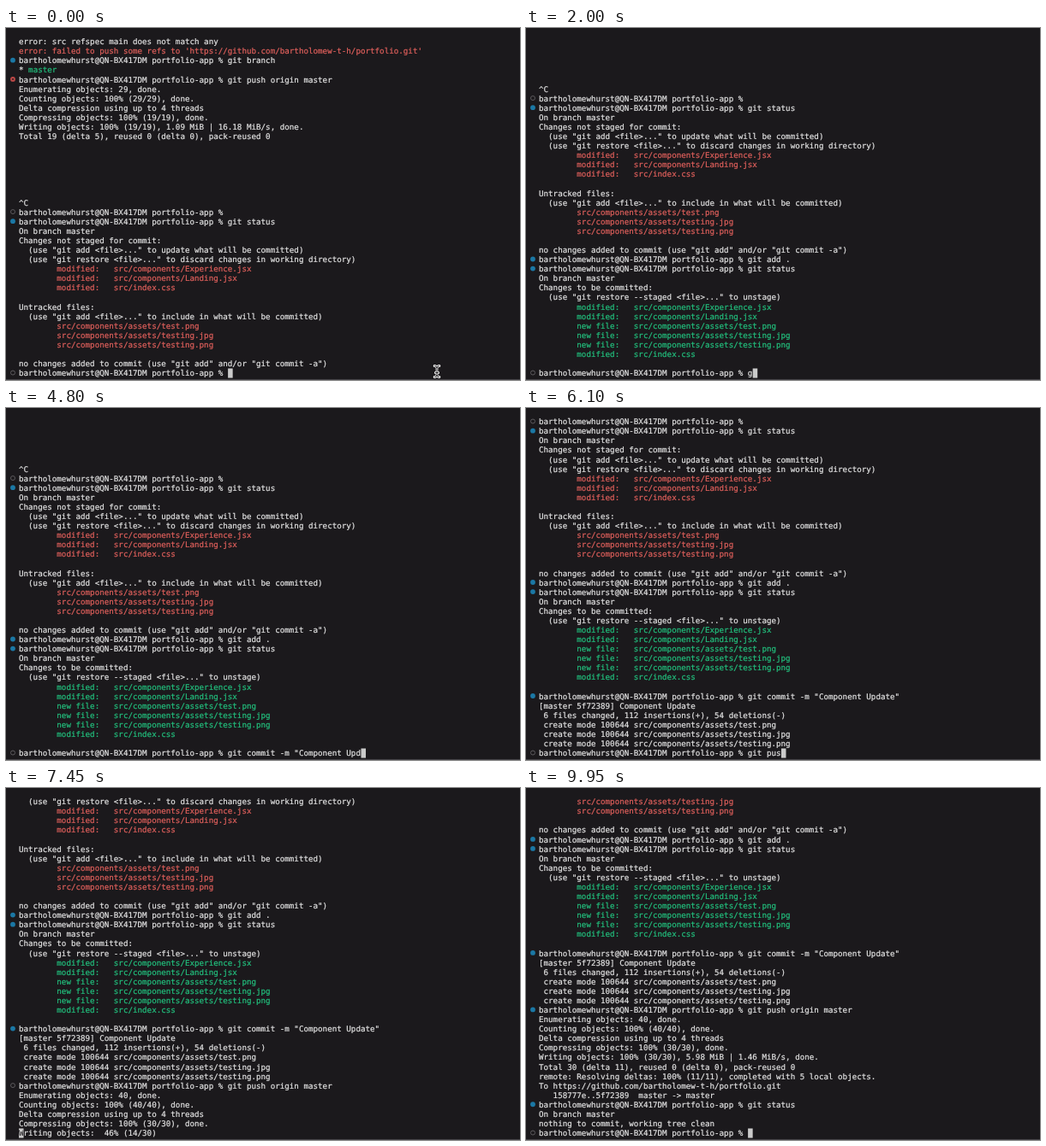
Animation of 600 by 412 pixels, one loop 10 s. Source, as an HTML page:

```html
<!DOCTYPE html>
<html lang="en">
<head>
<meta charset="utf-8">
<title>Terminal session</title>
<style>
  html, body { margin: 0; width: 100%; height: 100%; overflow: hidden; background: #1b191c; }
  svg { display: block; width: 100vw; height: 100vh; }
  text {
    font: 9.215px "DejaVu Sans Mono", monospace;
    white-space: pre;
    text-rendering: geometricPrecision;
    font-variant-ligatures: none;
    stroke-width: 0.22px;
  }
</style>
</head>
<body>
<svg id="stage" viewBox="0 0 600 412">
  <rect width="600" height="412" fill="#1b191c"/>
  <rect y="411" width="600" height="1" fill="#454347"/>
  <g id="rows"></g>
  <rect id="cursor" fill="#cbcbcb"/>
  <text id="under" fill="#1b191c"></text>
  <g id="mouse" fill="none" stroke-linecap="round">
    <path id="beam" d="M500 395.5Q503 395.5 503 398Q503 395.5 506 395.5M503 398V406M500 408.5Q503 408.5 503 406Q503 408.5 506 408.5M501.3 403.5H504.7" stroke="#f4f4f4" stroke-width="2.4"/>
    <use href="#beam"/>
    <path d="M500.5 395.5Q503 395.5 503 398Q503 395.5 505.5 395.5M503 398V406M500.5 408.5Q503 408.5 503 406Q503 408.5 505.5 408.5M501.5 403.5H504.5" stroke="#1b191c" stroke-width="0.9"/>
  </g>
</svg>
<script>
const LOOP = 10000, STEP = 50, ROWS = 36;
const LEFT = 15, TOP = 10.5, PITCH = 11.085, CHAR = 5.548, BASE = 8.7;
const WHITE = '#e2e2e2', RED = '#de5f5b', GREEN = '#22bf7d';
const PROMPT = 'bartholomewhurst@QN-BX417DM portfolio-app % ';
const REPO = 'https://github.com/bartholomew-t-h/portfolio.git';
const ASSETS = ['test.png', 'testing.jpg', 'testing.png'].map(f => 'src/components/assets/' + f);
const TAB = ' '.repeat(8);

const $ = id => document.getElementById(id);
const line = (text = '', color = WHITE, lead = 0) => ({ text, color, lead, dot: '' });
const prompt = (cmd, dot) => ({ ...line(PROMPT + cmd), dot });
const plain = (...texts) => texts.map(t => line(t));
const files = (color, ...names) => names.map(n => line(TAB + n, color));

// Screen contents before the first key press
const initial = () => [
  line('error: src refspec main does not match any'),
  line(`error: failed to push some refs to '${REPO}'`, RED),
  prompt('git branch', 'ok'),
  line('* master', GREEN, 2),
  prompt('git push origin master', 'fail'),
  ...plain(
    'Enumerating objects: 29, done.',
    'Counting objects: 100% (29/29), done.',
    'Delta compression using up to 4 threads',
    'Compressing objects: 100% (19/19), done.',
    'Writing objects: 100% (19/19), 1.09 MiB | 16.18 MiB/s, done.',
    'Total 19 (delta 5), reused 0 (delta 0), pack-reused 0',
    '', '', '', '', '', '', '^C'),
  prompt('', 'idle'),
  prompt('git status', 'ok'),
  ...plain(
    'On branch master',
    'Changes not staged for commit:',
    '  (use "git add <file>..." to update what will be committed)',
    '  (use "git restore <file>..." to discard changes in working directory)'),
  ...files(RED,
    'modified:   src/components/Experience.jsx',
    'modified:   src/components/Landing.jsx',
    'modified:   src/index.css'),
  ...plain('', 'Untracked files:',
    '  (use "git add <file>..." to include in what will be committed)'),
  ...files(RED, ...ASSETS),
  ...plain('', 'no changes added to commit (use "git add" and/or "git commit -a")'),
  prompt('', 'idle')
];

// Timeline of edits to the list of lines
const events = [];
const at = (time, run) => events.push({ time, run });
const last = lines => lines[lines.length - 1];

function type(text, from, to = from) {
  const gaps = Math.max(1, text.length - 1);
  [...text].forEach((ch, i) => {
    const time = from + Math.round((to - from) * i / gaps / STEP) * STEP;
    at(time, lines => { last(lines).text += ch; });
  });
}
const enter = time => at(time, lines => lines.push(line()));
const show = (time, text) => at(time, lines => { last(lines).text = text; });
const print = (time, rows) => at(time, lines => {
  lines.pop();
  lines.push(...rows.map(r => ({ ...r })), line());
});
const finish = time => at(time, lines => {
  lines.pop();
  lines.findLast(l => l.dot).dot = 'ok';
  lines.push(prompt('', 'idle'));
});
const progress = (label, done, total) =>
  `${label}: ${String(Math.floor(100 * done / total)).padStart(3)}% (${done}/${total})`;

type('git add', 50, 400);
type(' ', 500);
type('.', 650);
enter(700);
finish(750);

type('git', 1000, 1100);
type(' s', 1200, 1250);
type('tatu', 1350, 1550);
type('s', 1700);
enter(1700);
print(1750, [
  ...plain('On branch master', 'Changes to be committed:',
    '  (use "git restore --staged <file>..." to unstage)'),
  ...files(GREEN,
    'modified:   src/components/Experience.jsx',
    'modified:   src/components/Landing.jsx',
    ...ASSETS.map(a => 'new file:   ' + a),
    'modified:   src/index.css'),
  line()
]);
finish(1750);

type('git commit', 2000, 2600);
type(' ', 2750);
type('-m', 2950, 3050);
type(' "C', 3200, 3500);
type('omponent Up', 3750, 4750);
type('date', 4800, 5000);
type('"', 5450);
enter(5450);
print(5500, plain('[master 5f72389] Component Update',
  ' 6 files changed, 112 insertions(+), 54 deletions(-)',
  ...ASSETS.map(a => ' create mode 100644 ' + a)));
finish(5500);

type('git pus', 5750, 6100);
type('h ', 6250, 6300);
type('or', 6500);
type('igin master', 6550, 7050);
enter(7250);
print(7300, plain('Enumerating objects: 40, done.',
  'Counting objects: 100% (40/40), done.',
  'Delta compression using up to 4 threads'));
show(7300, progress('Compressing objects', 12, 30));
print(7350, plain('Compressing objects: 100% (30/30), done.'));
[3, 9, 14].forEach((n, i) => show(7350 + i * STEP, progress('Writing objects', n, 30)));
for (let i = 1; i <= 15; i++) {
  const size = (5.98 * i / 15).toFixed(2);
  show(7450 + i * STEP, `${progress('Writing objects', 14 + i, 30)}, ${size} MiB | 1.46 MiB/s`);
}
print(8250, plain('Writing objects: 100% (30/30), 5.98 MiB | 1.46 MiB/s, done.',
  'Total 30 (delta 11), reused 0 (delta 0), pack-reused 0'));
for (let n = 0; n <= 5; n++) show(8300 + n * STEP, progress('remote: Resolving deltas', n * 2, 11));
print(8600, plain('remote: Resolving deltas: 100% (11/11), completed with 5 local objects.'));
print(8800, plain('To ' + REPO, '   158777e..5f72389  master -> master'));
finish(8850);

type('git statu', 9000, 9500);
type('s', 9700);
enter(9700);
print(9750, plain('On branch master', 'nothing to commit, working tree clean'));
finish(9800);

// Drawing
function add(parent, tag, attrs = {}) {
  const el = document.createElementNS('http://www.w3.org/2000/svg', tag);
  set(el, attrs);
  return parent.appendChild(el);
}
function set(el, attrs) {
  for (const k in attrs) el.setAttribute(k, attrs[k]);
}

const slots = Array.from({ length: ROWS }, (_, r) => {
  const y = TOP + r * PITCH, cy = y + PITCH / 2 - 0.5;
  const text = add($('rows'), 'text', { x: LEFT, y: y + BASE });
  return {
    lead: add(text, 'tspan', { fill: WHITE, stroke: WHITE }),
    body: add(text, 'tspan'),
    dot: add($('rows'), 'circle', { cx: 8, cy }),
    cross: add($('rows'), 'path', {
      d: `M7 ${cy - 1}l2 2m0 -2l-2 2`, stroke: '#1b191c', 'stroke-width': 0.8
    })
  };
});
const DOTS = {
  '': { r: 0, fill: 'none', stroke: 'none' },
  ok: { r: 2.9, fill: '#1b78a5', stroke: 'none' },
  fail: { r: 2.9, fill: '#c24a48', stroke: 'none' },
  idle: { r: 2.5, fill: 'none', stroke: '#626064', 'stroke-width': 0.9 }
};

function draw(t) {
  const all = initial();
  for (const e of events) if (e.time <= t) e.run(all);
  const lines = all.slice(-ROWS);
  slots.forEach((slot, r) => {
    const { text, color, lead, dot } = lines[r];
    slot.lead.textContent = text.slice(0, lead);
    slot.body.textContent = text.slice(lead);
    set(slot.body, { fill: color, stroke: color });
    set(slot.dot, DOTS[dot]);
    set(slot.cross, { visibility: dot === 'fail' ? 'visible' : 'hidden' });
  });

  const cur = last(lines);
  const col = cur.dot ? cur.text.length : 0;
  const x = LEFT + col * CHAR, y = TOP + (ROWS - 1) * PITCH;
  set($('cursor'), { x, y, width: CHAR, height: PITCH });
  set($('under'), { x, y: y + BASE });
  $('under').textContent = cur.text[col] || '';
  set($('mouse'), { visibility: t < 50 ? 'visible' : 'hidden' });
}

let shown = -1;
function tick() {
  const t = Math.floor(performance.now() % LOOP / STEP) * STEP;
  if (t !== shown) draw(shown = t);
  requestAnimationFrame(tick);
}
tick();
</script>
</body>
</html>
```
